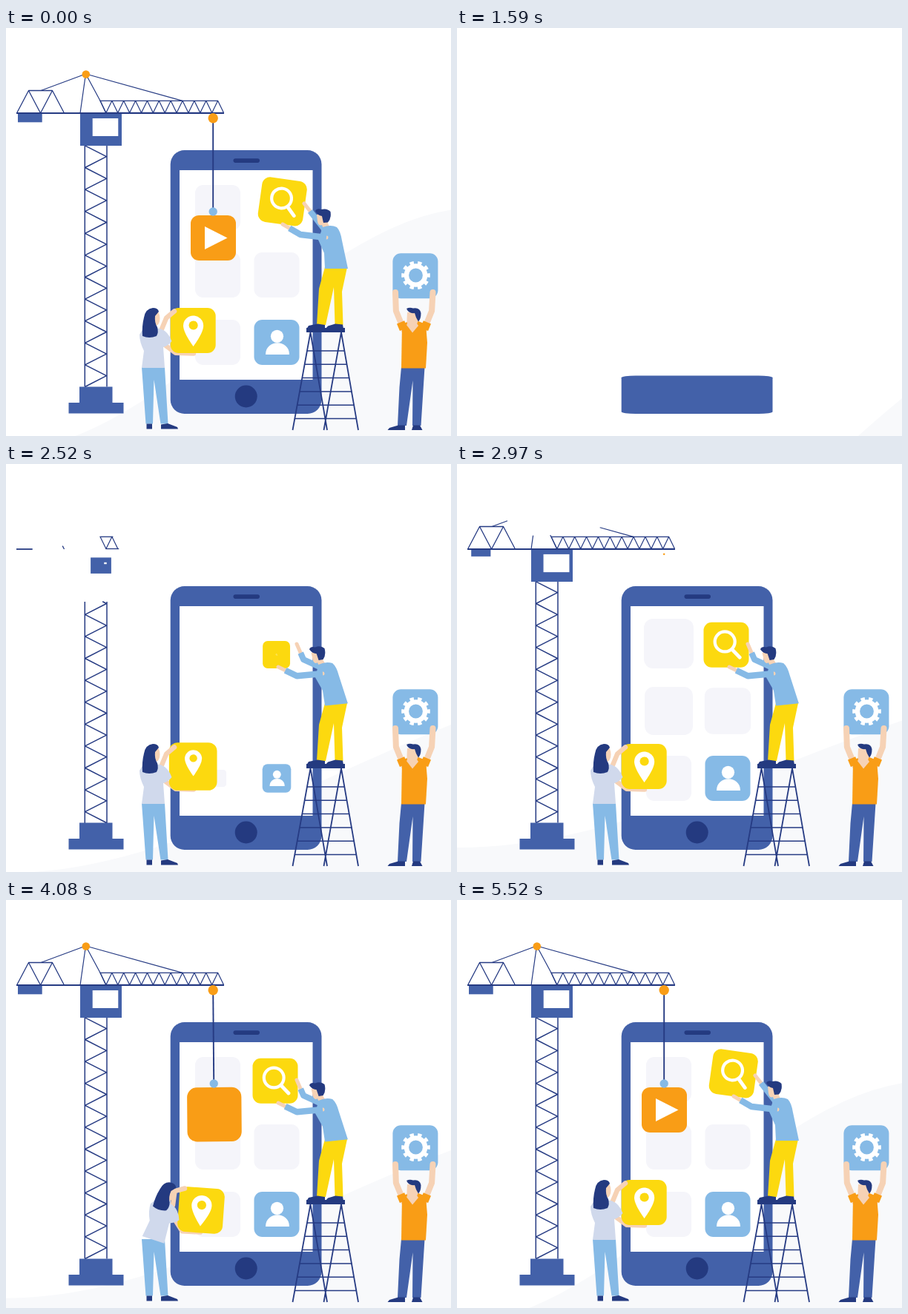
Recreate the animation shown at these times as an HTML page. Size 600 px wide and 551 px high, loop 5550 ms.

```html
<!DOCTYPE html>
<html lang="en">
<head>
<meta charset="utf-8">
<title>App construction</title>
<style>
  html, body { margin: 0; width: 100%; height: 100%; overflow: hidden; background: #fff; }
  svg { display: block; width: 100vw; height: 100vh; }
  .line { fill: none; stroke: #263b83; stroke-width: 1.5; stroke-linejoin: round; }
  .limb { fill: none; stroke-linejoin: round; }
  .blue { fill: #4361a9; } .navy { fill: #243a80; } .orange { fill: #f99d16; }
  .yellow { fill: #fcd90f; } .sky { fill: #86bae6; } .skin { fill: #f6d2b5; }
  .lilac { fill: #d0d9ec; } .slot { fill: #f5f5fa; } .white { fill: #fff; }
</style>
</head>
<body>
<svg id="stage" viewBox="0 0 600 551"></svg>
<script>
const LOOP = 5550, CUT = 1350, START = 1500;
const stage = document.getElementById('stage');
const $ = id => document.getElementById(id);

const box = (x, y, w, h, cls, r = 0) =>
  `<rect x="${x}" y="${y}" width="${w}" height="${h}" rx="${r}" class="${cls}"/>`;
const tile = (x, y, cls) => box(x, y, 61, 61, cls, 11);
const disc = (x, y, r, cls) => `<circle cx="${x}" cy="${y}" r="${r}" class="${cls}"/>`;
const shape = (d, cls) => `<path d="${d}" class="${cls}"/>`;
const group = (id, ...parts) => `<g id="${id}">${parts.join('')}</g>`;
const stroke = (id, d, w = 1.5) =>
  `<path id="${id}" d="${d}" class="line" style="stroke-width:${w}" pathLength="1" stroke-dasharray="1 2"/>`;
const zigzag = (n, at) => 'M' + Array.from({ length: n + 1 }, (_, i) => at(i).join(' ')).join('L');

// A bare arm, with an optional sleeve over the given share of its length.
const arm = (id, w, sleeve, sleeveWidth, share) =>
  `<polyline class="limb ${id}" stroke="#f6d2b5" stroke-width="${w}" stroke-linecap="round"/>` +
  (sleeve ? `<polyline class="limb ${id}" stroke="${sleeve}" stroke-width="${sleeveWidth}"
    pathLength="1" stroke-dasharray="${share} 2"/>` : '');

const SKY = '#86bae6', ORANGE = '#f99d16';
const SLOTS = [[255, 394], [334.5, 303], [255, 303], [255, 212]];

const rungs = Array.from({ length: 6 }, (_, i) => {
  const y = 436 + i * 18.3, d = (y - 411) * 0.18;
  return `M${410.5 - d} ${y}H${452 + d}`;
}).join('');

const gear = '<g fill="none" stroke="#fff"><circle cx="552.5" cy="334" r="12.6" stroke-width="6.4"/>' +
  '<circle cx="552.5" cy="334" r="17" stroke-width="4.6" pathLength="20" stroke-dasharray="1 1" stroke-dashoffset=".5"/></g>';

stage.innerHTML = [
  '<path id="hill" fill="#f8f9fb"/>',
  group('tower',
    stroke('railL', 'M106.3 484.5V159'), stroke('railR', 'M136 484.5V159'),
    stroke('brace', zigzag(22, i => [i % 2 ? 135.5 : 106.5, 484.5 - i * 14.8]))),
  group('base', box(84.5, 506, 74, 14.5, 'blue'), box(99, 484.5, 44.5, 22, 'blue')),

  group('phone', box(221.7, 165, 203.8, 356, 'blue', 19)),
  group('screen', box(234, 192, 179.5, 283, 'white')),
  group('speaker', box(306.5, 176.3, 35.5, 5.6, 'navy', 2.8)),
  group('home', disc(323.7, 497.5, 15, 'navy')),
  ...SLOTS.map(([x, y], i) => group('slot' + i, tile(x, y, 'slot'))),
  group('user', tile(334.5, 394, 'sky'), disc(365.5, 416.3, 8.6, 'white'),
    shape('M350 441C350 420 382 420 382 441Z', 'white')),

  group('cabin', box(100, 115.5, 56, 43.5, 'blue')),
  group('window', box(116.7, 122, 34.6, 24, 'white')),
  group('weight', box(16, 115, 32.7, 12.3, 'blue')),
  stroke('beam', 'M14 115H294', 1.8),
  stroke('counter', zigzag(4, i => [78.5 - i * 16, i % 2 ? 84.5 : 115]), 1.3),
  stroke('counterTop', 'M62.5 84.5H30.5', 1.3),
  stroke('truss', zigzag(21, i => [127 + i * 7.93, i % 2 ? 114.5 : 98.3]), 1.2),
  stroke('trussTop', 'M126.5 98.3H286', 1.3),
  stroke('trussBase', 'M134.5 114.5H293', 1.3),
  ...['M47 84.5L107.5 62', 'M238 98.3L107.5 62', 'M100 115L107.5 62', 'M134.5 114.5L127 98.3L107.5 62']
    .map((d, i) => stroke('cable' + i, d, 1.2)),
  group('peak', disc(107.8, 62.6, 5.3, 'orange')),

  group('swing',
    stroke('rope', 'M279.2 122V248', 1.9),
    group('play', tile(249, 253, 'orange')),
    group('playMark', shape('M268 268L298.5 283.5L268 299Z', 'white')),
    group('hook', disc(279.2, 248, 5.7, 'sky'))),
  group('trolley', disc(279.2, 121.8, 6.7, 'orange')),

  group('ladder', box(405, 405, 52, 6, 'navy'), shape(rungs, 'line'),
    '<path class="line" style="stroke-width:1.8" d="M410.5 411L386.5 543M410.5 411L433 543M452 411L475 543M452 411L428.5 543"/>'),

  group('search', tile(332.5, 213.7, 'yellow'),
    group('lens', '<g fill="none" stroke="#fff"><circle cx="361.2" cy="240" r="13.4" stroke-width="4.2"/>' +
      '<path d="M371 250.5L381 261" stroke-width="4.8" stroke-linecap="round"/></g>')),

  group('climber',
    shape('M430 323H460L453 356L454.5 401H443.5L442 350L431 401H419L422 352Z', 'yellow'),
    shape('M405.5 406L408 402L420 399.5L430 401V406ZM431 406L434 402.5L444 399.5L454 400.5L455 406Z', 'navy'),
    arm('reachArm', 5, SKY, 8, 0.72),
    group('climberTop',
      shape('M419 252L427 250L432 259L436 268L428 271L426 266Q421 268 420 261Z', 'skin'),
      shape('M417 247Q419 243 425 245Q433 243 437.5 248Q439 257 434 262.5L428 263L426 254Q420 253 417 247Z', 'navy'),
      shape('M427 269Q438 265 446 269Q451 274 453 287L461 325H430L429 304L421 286Z', 'sky')),
    arm('holdArm', 5, SKY, 8.5, 0.83)),

  group('womanBack', arm('lowArm', 6.5)),
  group('pin', tile(221.7, 378, 'yellow'),
    group('pinMark', shape('M252.6 430Q239 411 239 402A13.6 13.6 0 0 1 266.2 402Q266.2 411 252.6 430Z', 'white'),
      disc(252.6, 401.5, 6.1, 'yellow'))),
  group('woman',
    shape('M183 458H214L218.5 534.5H208.5L199.5 475L198 534.5H188.5Z', 'sky'),
    shape('M189.5 534.5H197V541.5H189.5ZM209 535.5L218 534L231 539L232 541.5H209Z', 'navy'),
    arm('highArm', 6.5),
    group('womanTop',
      shape('M184 408Q194 403 208 406Q219 410 223.5 423Q219 429 212 431L214 459H183L186 436Q180 424 180 414Z', 'lilac'),
      '<ellipse cx="202.5" cy="392" rx="5" ry="10" class="skin"/>',
      shape('M186 391Q188 379 198 378Q205 378 206 383L201 389Q200 398 204 404Q206 411 203 416Q193 420 184 416Q183 403 186 391Z', 'navy'))),

  group('man',
    group('gearBox', tile(521.4, 304.3, 'sky'), group('gear', gear)),
    arm('leftArm', 8, ORANGE, 11, 0.2), arm('rightArm', 8, ORANGE, 11, 0.2),
    shape('M533 458H564.5L559.5 537H548L548.5 476L540 537H528L530.5 485Z', 'blue'),
    shape('M514.5 543L517 540L529 536.5H538V543ZM547 543L549 536.5H558L561.5 543Z', 'navy'),
    shape('M534 400L543 396H556L566 400L568 425L566 459.5H533Z', 'orange'),
    shape('M540 401L548 411.5L556 402L552 396H543Z', 'skin'),
    group('manHead',
      shape('M541 384H556L556 395L553 402L548 406L545 402Q540 402 540.5 394Z', 'skin'),
      shape('M540 379Q544 377 549 378.5Q558 377 559.5 385Q559.5 393 556 396.5L553 391L551 385Q543 386 540 379Z', 'navy')))
].join('');

const clamp = x => Math.min(1, Math.max(0, x));
const smooth = x => x * x * (3 - 2 * x);
const ease = (t, start, span) => smooth(clamp((t - start) / span));
const mix = (a, b, k) => a + (b - a) * k;

// Grows from nothing, passes full size and settles back.
function pop(t, start, over = 1.7, span = 500) {
  const x = clamp((t - start) / span), u = x - 1;
  return x && 1 + (over + 1) * u ** 3 + over * u * u;
}

// Cosine hump that wraps around the loop.
function hump(t, centre, half) {
  const d = Math.abs(((t - centre + LOOP * 1.5) % LOOP) - LOOP / 2);
  return d < half ? (1 + Math.cos(Math.PI * d / half)) / 2 : 0;
}

const move = (id, transform) => $(id).setAttribute('transform', transform);

function grow(id, sx, x, y, sy = sx, before = '') {
  $(id).style.display = sx && sy ? '' : 'none';
  move(id, `${before}translate(${x} ${y}) scale(${sx} ${sy}) translate(${-x} ${-y})`);
}

function trace(id, t, start, span) {
  const k = clamp((t - start) / span);
  $(id).style.display = k ? '' : 'none';
  $(id).setAttribute('stroke-dashoffset', 1 - k);
}

// Two bones: the elbow follows from the shoulder, the hand and the bone lengths.
function reach(name, [sx, sy], [hx, hy], upper, lower, side) {
  const dx = hx - sx, dy = hy - sy, dist = Math.hypot(dx, dy);
  const along = (upper ** 2 - lower ** 2 + dist ** 2) / (2 * dist);
  const out = side * Math.sqrt(Math.max(0, upper ** 2 - along ** 2));
  const ex = sx + (dx * along - dy * out) / dist;
  const ey = sy + (dy * along + dx * out) / dist;
  for (const line of document.getElementsByClassName(name))
    line.setAttribute('points', `${sx},${sy} ${ex},${ey} ${hx},${hy}`);
}

function drawHill(b) {
  const drift = ease(b, 3700, 2700);
  const rise = Math.exp(-(b - START) / 300);
  const left = 545 + 36 * Math.cos(2 * Math.PI * (b - 5100) / 3600) + 450 * rise;
  const right = mix(345, 215, drift) + 210 * rise;
  const slope = u => mix(u * u, smooth(u), mix(0.4, 1, drift));
  $('hill').style.display = b < START ? 'none' : '';
  $('hill').setAttribute('d',
    zigzag(30, i => [i * 20, mix(left, right, slope(i / 30))]) + 'V1100H0Z');
}

function drawCrane(b) {
  grow('base', pop(b, 1540), 121, 520.5, pop(b, 1640));
  for (const id of ['railL', 'railR', 'brace']) trace(id, b, 2080, 458);
  move('tower', `translate(0 ${14.8 * (1 - ease(b, 2530, 200))})`);
  grow('cabin', pop(b, 2458), 128, 137);
  grow('window', pop(b, 2510), 134, 134);
  trace('beam', b, 2490, 400);
  trace('counter', b, 2505, 450);
  trace('counterTop', b, 2600, 300);
  trace('truss', b, 2446, 520);
  trace('trussTop', b, 2465, 500);
  trace('trussBase', b, 2465, 500);
  for (let i = 0; i < 4; i++) trace('cable' + i, b, 2860, 320);
  grow('weight', pop(b, 2850), 32, 115);
  grow('peak', pop(b, 3080), 107.8, 62.6);
  grow('trolley', pop(b, 2950), 279.2, 121.8);
  trace('rope', b, 3200, 348);
  grow('hook', pop(b, 3560), 279.2, 248);
  grow('play', pop(b, 3820, 2.6), 279.3, 253);
  grow('playMark', pop(b, 4085), 280, 283.5);
  const s = clamp((b - 4000) / 1130);
  move('swing', `rotate(${-1.1 * Math.sin(2 * Math.PI * s)} 279.2 122)`);
}

function drawPhone(b) {
  grow('phone', 1, 323, 521, ease(b, START, 380));
  grow('screen', 1, 323, 475, ease(b, 1892, 345));
  grow('speaker', pop(b, 2060, 1.7, 400), 324, 179);
  grow('home', pop(b, 2060, 1.7, 400), 323.7, 497.5);
  SLOTS.forEach(([x, y], i) => grow('slot' + i, pop(b, 2475 + i * 60), x + 30.5, y + 30.5));
  grow('user', pop(b, 2435), 365, 424.5);
}

function drawClimber(b) {
  const k = hump(b, 3540, 500) + hump(b, LOOP - 15, 500);
  grow('ladder', pop(b, 1648), 431, 543);
  grow('search', pop(b, 2440), 367, 278, undefined,
    `translate(${9.8 * k} ${-9.8 * k}) rotate(${8 * k} 363.2 244.2) `);
  grow('lens', pop(b, 2510), 363.2, 244.2);
  grow('climber', pop(b, 2017), 437, 406);
  move('climberTop', `rotate(${-6 * (1 - k)} 444 325)`);
  reach('reachArm', [423 + 8 * k, 274], [392 + 10 * k, 243 - 6 * k], 24, 23, -1);
  reach('holdArm', [427 + 5 * k, 283], [367 + 6 * k, 274 - 9 * k], 35, 28, -1);
}

function drawWoman(b) {
  const k = hump(b, 4080, 700) + hump(b, 2010, 400), size = pop(b, 2006);
  grow('womanBack', size, 207, 542);
  grow('woman', size, 207, 542);
  grow('pin', pop(b, 2300), 252.3, 408.5, undefined,
    `translate(${10.8 * k} ${10.5 * k}) rotate(${4 * k} 252.3 408.5) `);
  grow('pinMark', pop(b, 2400), 252.5, 384);
  move('womanTop', `rotate(${18 * k} 199 459)`);
  reach('highArm', [209 + 16 * k, 409 + 3 * k], [227 + 14 * k, 382.5 + 7 * k], 19, 14, -1);
  reach('lowArm', [214 + 14 * k, 428 + 4 * k], [253 + 9 * k, 439.5 + 9 * k], 18, 24.5, 1);
}

function drawMan(b) {
  const k = hump(b, 3525, 500) + hump(b, 650, 500);
  const dx = 3.6 * k, dy = 5.5 * k;
  grow('man', pop(b, 1668), 538, 543);
  grow('gearBox', pop(b, 1920), 521.5, 365, undefined, `translate(${dx} ${dy}) `);
  grow('gear', pop(b, 2030), 552.5, 334);
  reach('leftArm', [536, 407], [525 + dx, 357 + dy], 27, 25, -1);
  reach('rightArm', [564, 407], [575.5 + dx, 357 + dy], 27, 25, 1);
  move('manHead', `translate(${-1.8 * k} ${0.6 * k})`);
}

// Building starts after the cut, so the first part of the loop shows its end.
function draw(now) {
  const t = now % LOOP;
  const built = t < CUT ? t + LOOP : t;
  for (const part of [drawHill, drawCrane, drawPhone, drawClimber, drawWoman, drawMan]) part(built);
}

const begin = performance.now();
function tick() {
  draw(performance.now() - begin);
  requestAnimationFrame(tick);
}
tick();
</script>
</body>
</html>
```
